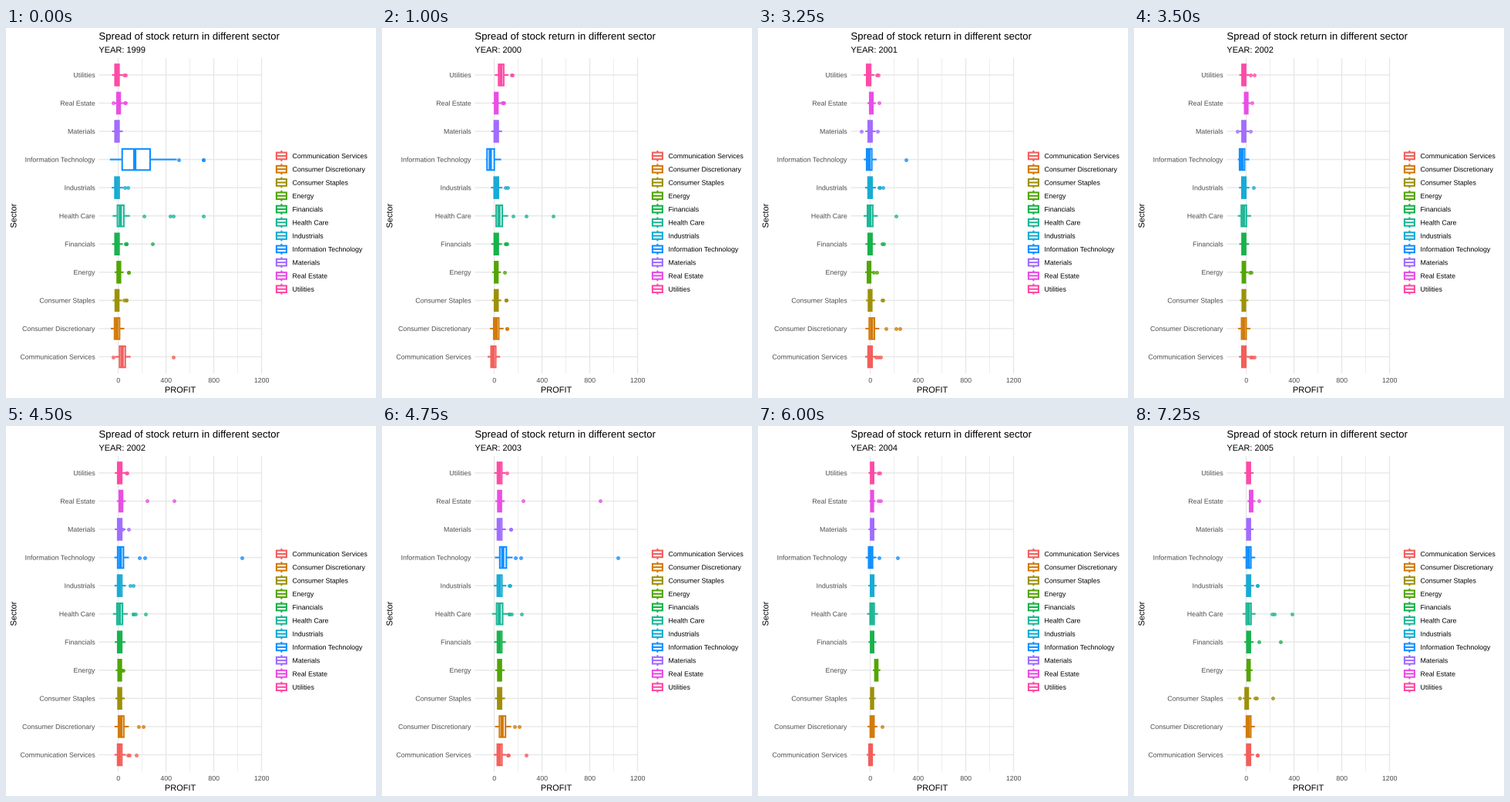
A matplotlib script that plays this animation: 480 by 480 pixels, repeating every 8000 ms.

```python
import random

import matplotlib.pyplot as plt
from matplotlib.animation import FuncAnimation
from matplotlib.patches import PathPatch, Rectangle
from matplotlib.textpath import TextPath
from matplotlib.transforms import Affine2D

plt.rcParams.update({
    "font.family": "Liberation Sans",
    "path.snap": False,
    "toolbar": "None",
})

SIZE, DPI = 480, 72            # at 72 dpi one point is one pixel
HOLD, STEP_MS, FRAMES = 5, 250, 32
LINE = 2.1
LEFT, RIGHT, TOP, BOTTOM = 120.4, 331.5, 39.0, 448.4
ZERO, PX_PER_UNIT = 145.6, 0.1549
ROW_TOP, ROW_GAP = 60.9, 36.56
WORST = -70                    # lowest whisker end

# Colour and usual half width of the box
SECTORS = {
    "Utilities": ("#FE4AA5", 15),
    "Real Estate": ("#E94EE6", 12),
    "Materials": ("#A16CFF", 15),
    "Information Technology": ("#1190FF", 20),
    "Industrials": ("#18ABD4", 16),
    "Health Care": ("#1FB697", 21),
    "Financials": ("#18B24B", 15),
    "Energy": ("#52A505", 12),
    "Consumer Staples": ("#9D910A", 13),
    "Consumer Discretionary": ("#D17B0A", 19),
    "Communication Services": ("#F35E5A", 16),
}
(UTIL, ESTATE, MATERIALS, TECH, INDUSTRY, HEALTH,
 FINANCE, ENERGY, STAPLES, DISCRETIONARY, COMMS) = SECTORS

# Market level, spread, sectors that leave the market, far outliers
YEARS = {
    1999: (-10, 1.1, {TECH: 150, HEALTH: 20, COMMS: 35, ENERGY: 5, ESTATE: 3},
           {TECH: [715, 715], HEALTH: [714, 458, 438, 214],
            FINANCE: [288], COMMS: [462]}),
    2000: (17, 1.1, {UTIL: 58, TECH: -30, HEALTH: 42, COMMS: -7},
           {HEALTH: [491, 268]}),
    2001: (18, 1.1, {UTIL: -6, DISCRETIONARY: 47, ENERGY: 0},
           {TECH: [301], HEALTH: [218], DISCRETIONARY: [248, 214]}),
    2002: (-20, 1.0, {ESTATE: 0, TECH: -35}, {}),
    2003: (45, 1.2, {TECH: 74, DISCRETIONARY: 69},
           {ESTATE: [888, 241], TECH: [1038, 219], HEALTH: [228],
            DISCRETIONARY: [212], COMMS: [267]}),
    2004: (16, 0.8, {ENERGY: 51, TECH: 3, COMMS: 3}, {TECH: [229]}),
    2005: (20, 0.95, {ESTATE: 41, STAPLES: 4},
           {HEALTH: [383, 235, 213], FINANCE: [287], STAPLES: [225]}),
}

fig = plt.figure(figsize=(SIZE / DPI, SIZE / DPI), dpi=DPI, facecolor="white")
ax = fig.add_axes([0, 0, 1, 1])
ax.set(xlim=(0, SIZE), ylim=(SIZE, 0))
ax.axis("off")


def summarise(year, name):
    """Whisker, quartile, median, quartile, whisker, then outliers."""
    rng = random.Random(f"{year} {name}")
    market, spread, apart, far = YEARS[year]
    mid = apart.get(name, market)
    # boxes far from the market are also wider
    half = SECTORS[name][1] * spread * (1 + ((mid - market) / 77) ** 2)
    low = max(mid - 2.5 * half, WORST)
    high = mid + 2.9 * half
    near = rng.choices(range(4), weights=(7, 6, 5, 2))[0]
    dots = far.get(name, []) + [high + rng.uniform(8, 45) for _ in range(near)]
    if rng.random() < 0.12:
        dots.append(low - rng.uniform(8, 25))
    return [low, mid - half, mid - 0.1 * half, mid + half, high, *dots]


def to_px(value):
    return ZERO + value * PX_PER_UNIT


def row_y(row):
    return ROW_TOP + row * ROW_GAP


def line(xs, ys, color, width, z):
    return ax.plot(xs, ys, color=color, lw=width, zorder=z,
                   solid_capstyle="butt")[0]


def label(x, y, text, size, color="black", align=0.0, turn=0):
    """Text as outlines, so that letters sit between whole pixels."""
    path = TextPath((0, 0), text, size=size)
    place = Affine2D().translate(-align * path.get_extents().x1, 0)
    place.rotate_deg(turn).scale(1, -1).translate(x, y)
    return ax.add_patch(PathPatch(place.transform_path(path), fc=color, lw=0))


def frame_box(x, y, w, h, color, z):
    return ax.add_patch(Rectangle((x, y), w, h, fc="white", ec=color,
                                  lw=LINE, zorder=z))


def draw_static():
    for value in range(0, 1201, 200):
        x, major = to_px(value), value % 400 == 0
        line([x, x], [TOP, BOTTOM], "#E8E8E8", 1.4 if major else 0.7, 1)
        if major:
            label(x, 460, str(value), 8.8, "#4D4D4D", align=0.5)
    for row, name in enumerate(SECTORS):
        y = row_y(row)
        line([LEFT, RIGHT], [y, y], "#E8E8E8", 1.4, 1)
        label(115.4, y + 3.15, name, 8.8, "#4D4D4D", align=1)

    label(120.4, 15, "Spread of stock return in different sector", 13.2)
    label((LEFT + RIGHT) / 2, 473, "PROFIT", 11, align=0.5)
    label(13.4, (TOP + BOTTOM) / 2, "Sector", 11, align=0.5, turn=90)

    key, cx = 17.28, 357.4
    for i, (name, (color, _)) in enumerate(reversed(SECTORS.items())):
        y = 165.9 + i * key
        for side in (-1, 1):
            line([cx, cx], [y + side * 0.4 * key, y + side * 0.25 * key],
                 color, LINE, 2)
        frame_box(cx - 0.375 * key, y - key / 4, 0.75 * key, key / 2, color, 2)
        line([cx - 0.375 * key, cx + 0.375 * key], [y, y], color, LINE, 3)
        label(371.5, y + 3.15, name, 8.8)


def blend(a, b, t):
    """Mix two rows; outliers without a partner keep their place."""
    n = min(len(a), len(b))
    return [p + (q - p) * t for p, q in zip(a, b)] + a[n:] + b[n:]


def draw_row(row, color, data):
    lo, q1, med, q3, hi, *dots = map(to_px, data)
    y, half, z = row_y(row), 0.375 * ROW_GAP, 4 + row
    parts = [
        line([lo, q1], [y, y], color, LINE, z),
        line([q3, hi], [y, y], color, LINE, z),
        frame_box(q1, y - half, q3 - q1, 2 * half, color, z),
        line([med, med], [y - half, y + half], color, 2 * LINE, z + 0.1),
    ]
    if dots:
        parts.append(ax.scatter(dots, [y] * len(dots), s=25, color=color,
                                alpha=0.8, lw=0, zorder=z))
    return parts


draw_static()
moving = []


def update(i):
    while moving:
        moving.pop().remove()
    state, phase = divmod(i + 1, HOLD)
    year = min(YEARS) + state
    for row, (name, (color, _)) in enumerate(SECTORS.items()):
        data = summarise(year, name)
        if phase == HOLD - 1:
            data = blend(data, summarise(year + 1, name), 0.5)
        moving.extend(draw_row(row, color, data))
    moving.append(label(120.4, 32, f"YEAR: {year}", 11))
    return moving


anim = FuncAnimation(fig, update, frames=FRAMES, interval=STEP_MS,
                     repeat=True, repeat_delay=0, blit=False)
plt.show()
```
